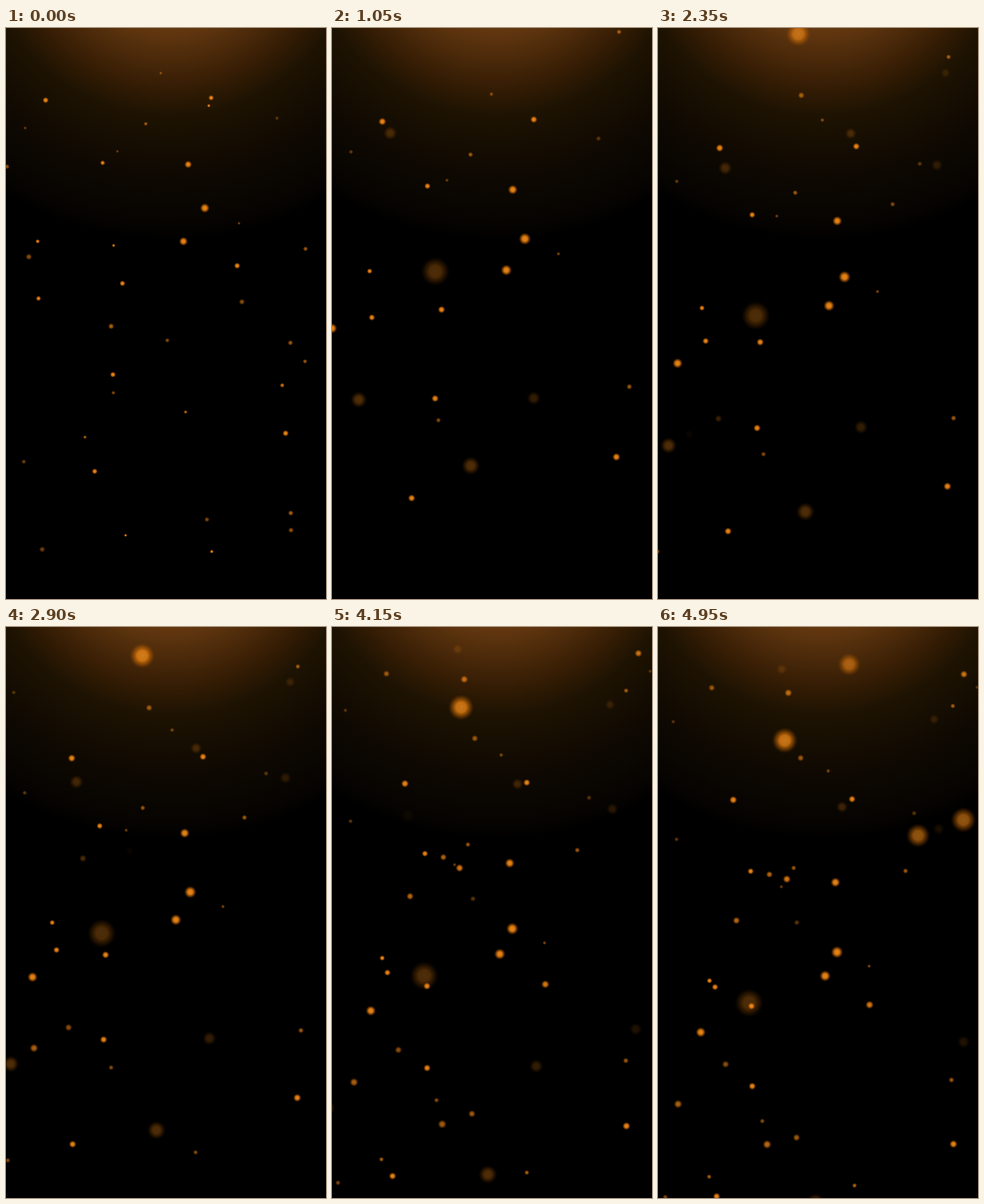
An HTML page that plays this animation: 404x720 px, repeating every 4980 ms.

```html
<!DOCTYPE html>
<html lang="en">
<head>
<meta charset="utf-8">
<title>Falling embers</title>
<style>
  html, body { margin: 0; width: 100%; height: 100%; overflow: hidden; background: #000; }
  svg { display: block; width: 100%; height: 100%; }
</style>
</head>
<body>
<svg viewBox="0 0 404 720" preserveAspectRatio="xMidYMid slice">
  <defs>
    <radialGradient id="sky" gradientUnits="userSpaceOnUse" cx="207" cy="-130" r="400">
      <stop offset=".325" stop-color="#643810"/>
      <stop offset=".42" stop-color="#4c2a0a"/>
      <stop offset=".515" stop-color="#341c04"/>
      <stop offset=".6" stop-color="#1e1302"/>
      <stop offset=".78" stop-color="#0f0902"/>
      <stop offset=".96" stop-color="#050301"/>
      <stop offset=".99" stop-color="#000"/>
    </radialGradient>
    <radialGradient id="ember">
      <stop offset="0" stop-color="#ff9a24"/>
      <stop offset=".4" stop-color="#f88a14"/>
      <stop offset=".7" stop-color="#c06400" stop-opacity=".6"/>
      <stop offset="1" stop-color="#803800" stop-opacity="0"/>
    </radialGradient>
  </defs>
  <rect width="404" height="720" fill="url(#sky)"/>
  <g id="embers"></g>
</svg>
<script>
const LOOP = 4.98, END = 4.95, W = 404, H = 720;
const layer = document.getElementById('embers');
const parts = [];

let seed = 7;
function rand(lo, hi) {
  seed = (seed * 16807) % 2147483647;
  return lo + (hi - lo) * seed / 2147483647;
}

const clamp = v => Math.max(0, Math.min(1, v));
const mix = (a, b, k) => a + (b - a) * k;

function add(x0, x1, y0, y1, r, alpha, from, to) {
  const el = document.createElementNS('http://www.w3.org/2000/svg', 'circle');
  el.setAttribute('fill', 'url(#ember)');
  layer.append(el);
  parts.push({ el, x0, x1, y0, y1, r, alpha, from, to });
}

// Rows: start x, end x, start y, end y, radius
function drift(rows, alpha, from = -1, to = 9) {
  for (const row of rows) add(...row, alpha, from, to);
}

// Random embers, spread over the stage halfway through their visible life
function scatter(count, [rMin, rMax], [aMin, aMax], birth, life, depth = H) {
  for (let i = 0; i < count; i++) {
    const from = birth(i / count), to = from + life;
    const mid = (clamp(from / END) + clamp(to / END)) / 2;
    const x = rand(0, W), y = rand(0, depth);
    const fall = rand(80, 190), sway = rand(-45, 45);
    const bend = (1 - mid) ** 1.5;
    add(x + sway * (1 - bend), x - sway * bend,
        y - fall * mid, y + fall * (1 - mid),
        rand(rMin, rMax), rand(aMin, aMax), from, to);
  }
}

// wide soft glows
drift([
  [137, 115, 262, 474, 14],
  [165, 199, 505, 726, 9],
  [53, -11, 422, 642, 8]
], .3, .2);
drift([[205, 160, -115, 143, 12.5]], .75, 2.1);

// leading embers
drift([
  [259, 245, 88, 217, 3.6],
  [230, 224, 172, 322, 4.8],
  [251, 226, 227, 410, 6],
  [224, 211, 269, 440, 5.5],
  [50, 95, 91, 218, 3.9],
  [122, 117, 170, 308, 3.2],
  [40, 65, 269, 446, 2.8],
  [41, 72, 341, 454, 3.3],
  [147, 118, 322, 478, 3.7],
  [135, 119, 437, 579, 3.7],
  [353, 373, 511, 652, 4],
  [112, 74, 559, 718, 3.7],
  [-23, 54, 343, 511, 5]
], .88);

scatter(10, [1.8, 3], [.3, .6], () => -1, 9);                // faint, lasting
scatter(20, [2, 4], [.4, .9], () => -1, 1.45);               // gone after the start
scatter(18, [2, 4.5], [.3, .8], k => mix(2, 4, k), 4);       // arriving one by one
scatter(7, [5, 7], [.12, .25], k => mix(.2, 3.5, k), 4);     // blurred
scatter(3, [11, 13], [.45, .6], () => 4.5, 4, H * .6);       // swelling at the end

function draw(t) {
  const left = Math.max(0, END - t) / END;
  const sway = left ** 1.5;                // sideways drift dies away
  const grow = mix(.8, 1, clamp(t / .5));  // all embers start smaller
  for (const p of parts) {
    const fade = clamp((t - p.from) / .3) * clamp((p.to - t) / .3);
    p.el.setAttribute('cx', mix(p.x1, p.x0, sway));
    p.el.setAttribute('cy', mix(p.y1, p.y0, left));
    p.el.setAttribute('r', p.r * 1.3 * grow);
    p.el.setAttribute('opacity', p.alpha * fade);
  }
}

const begin = performance.now();
function tick() {
  draw((performance.now() - begin) / 1000 % LOOP);
  requestAnimationFrame(tick);
}
tick();
</script>
</body>
</html>
```
